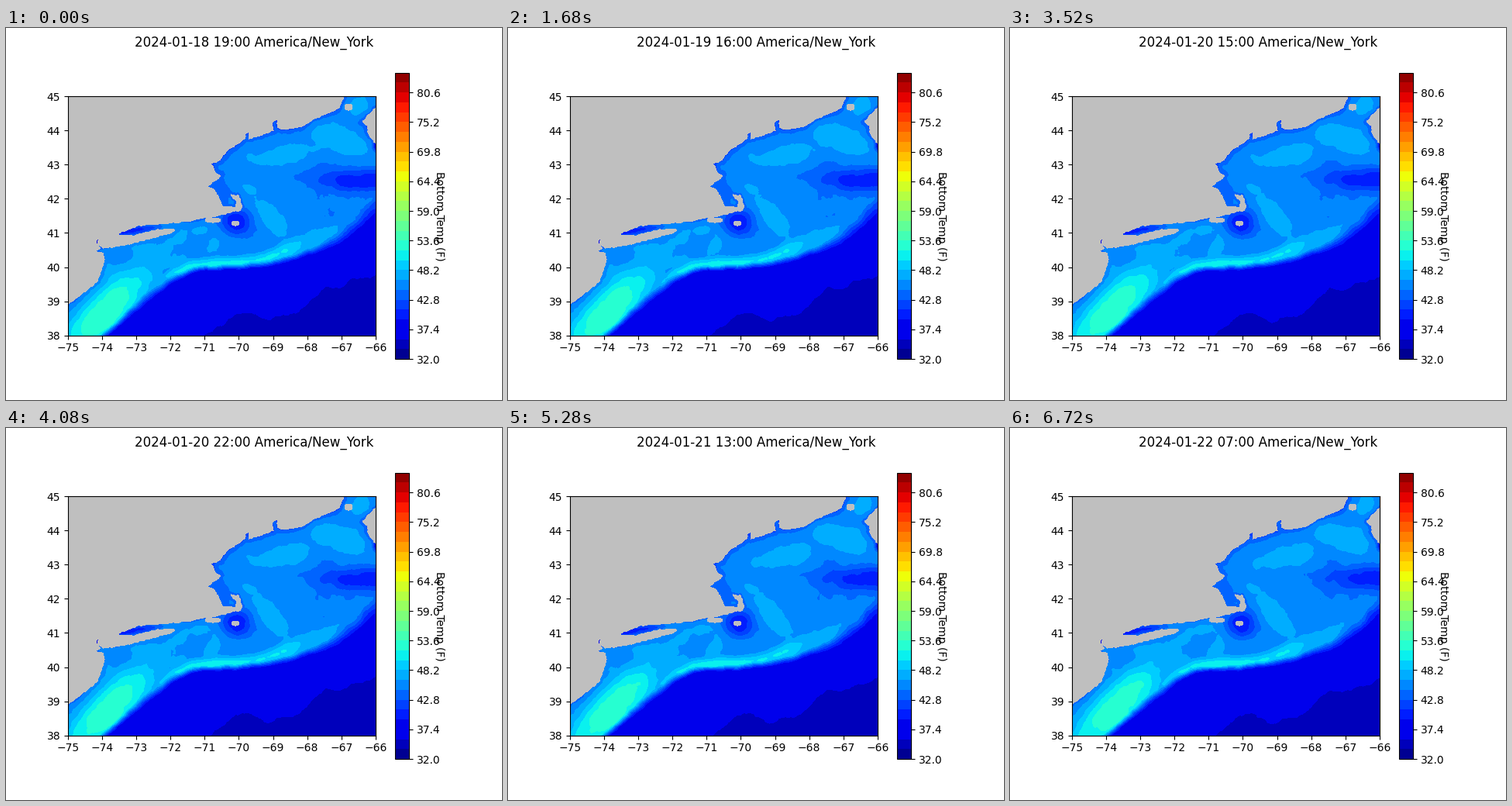
Animation, 640 px wide and 480 px high, one loop 6800 ms. Source, as a matplotlib script:

```python
import numpy as np
import matplotlib.pyplot as plt
from matplotlib.animation import FuncAnimation
from matplotlib.cm import ScalarMappable
from matplotlib.colors import ListedColormap, Normalize
from matplotlib.patches import Ellipse, Polygon
from matplotlib.transforms import Affine2D

FRAMES = 85
BANDS = 29
LEVELS = 32 + 1.8 * np.arange(BANDS + 1)
LAND = "0.75"

rng = np.random.default_rng(5)
palette = plt.get_cmap("jet")((np.arange(BANDS) + 0.5) / BANDS)
palette[2:4, 2] = 0.925  # both cold bands share one blue

fig, ax = plt.subplots(figsize=(6.4, 4.8), dpi=100)
scale = ScalarMappable(Normalize(LEVELS[0], LEVELS[-1]), ListedColormap(palette))
bar = fig.colorbar(scale, ax=ax, boundaries=LEVELS, ticks=LEVELS[::3],
                   format="%.1f")
bar.set_label("Bottom Temp (F)", rotation=270)
ax.set(xlim=(-75, -66), ylim=(38, 45), aspect="equal", facecolor=LAND,
       xticks=range(-75, -65), yticks=range(38, 46))
title = fig.suptitle("")

# Places are given in stage pixels, y down.
DEG = 9 / 396.8
stage = (Affine2D().translate(-80, -88.08).scale(DEG, -DEG)
         .translate(-75, 45) + ax.transData)
xs = np.linspace(80, 476.8, 240)
ys = np.linspace(88.08, 396.7, 187)
X, Y = np.meshgrid(xs, ys)
lon, lat = -75 + (xs - 80) * DEG, 45 - (ys - 88.08) * DEG


def jagged(points):
    """Split a coastline into short steps and shake them a little."""
    parts = []
    for a, b in zip(points, points[1:]):
        a, b = np.array(a, float), np.array(b, float)
        n = int(np.hypot(*(b - a)) / 3) + 1
        parts.append(a + np.linspace(0, 1, n, endpoint=False)[:, None] * (b - a))
    line = np.vstack(parts + [[points[-1]]])
    return line + rng.normal(0, 0.45, line.shape)


def noise():
    """Smooth random field with unit spread."""
    ky = np.fft.fftfreq(ys.size)[:, None]
    kx = np.fft.rfftfreq(xs.size)
    spectrum = np.fft.rfft2(rng.normal(size=X.shape))
    field = np.fft.irfft2(spectrum / (0.03 + np.hypot(kx, ky)) ** 2.2, X.shape)
    return (field - field.mean()) / field.std()


def soft_line(x, points):
    """Height of a rounded line through key points."""
    px, py = np.transpose(points)
    return np.mean([np.interp(x + s, px, py) for s in range(-6, 7, 2)], axis=0)


def bump(u, x, y, rx, ry, deg, amp, dx=0, dy=0):
    """Flat-topped oval that drifts by (dx, dy) over the loop."""
    c, s = np.cos(np.radians(deg)), np.sin(np.radians(deg))
    ox, oy = X - x - u * dx, Y - y - u * dy
    r2 = ((ox * c + oy * s) / rx) ** 2 + ((oy * c - ox * s) / ry) ** 2
    return amp / (1 + r2 ** 2)


# Coast
north = [(434, 80), (435, 90), (430, 103), (420, 108), (411, 112), (398, 117),
         (386, 125), (372, 129), (357, 131), (351, 129), (350, 118), (343, 122),
         (345, 132), (330, 138), (314, 143), (313, 134), (308, 137), (309, 140),
         (303, 147), (285, 158), (276, 170), (268, 174), (257, 174), (266, 177),
         (270, 187), (277, 191), (269, 197), (260, 205), (268, 208), (275, 219),
         (279, 230), (296, 231), (298, 223), (290, 216), (300, 216), (305, 230),
         (302, 235), (281, 240), (272, 243), (256, 245)]
south = [(256, 245), (238, 249), (222, 251), (190, 253), (170, 255), (152, 262),
         (141, 267), (166, 268), (190, 261), (216, 259), (217, 262), (204, 267),
         (175, 275), (148, 281), (125, 284), (120, 279), (118, 266), (117, 278),
         (121, 284), (115, 288), (125, 291), (127, 297), (123, 312), (117, 327),
         (104, 338), (91, 348), (80, 357), (70, 362)]
scotia = [(490, 98), (477, 104), (468, 112), (460, 121), (466, 126), (468, 138),
          (477, 149), (490, 158)]
main = np.vstack([jagged(north), jagged(south)])
east = jagged(scotia)
shapes = [Polygon(np.vstack([main, [(60, 362), (60, 80)]])), Polygon(east),
          Ellipse((442, 102), 10, 8), Ellipse((267, 248), 20, 6),
          Ellipse((296, 252), 10, 6)]
for shape in shapes:
    shape.set(facecolor=LAND, lw=0, antialiased=False, transform=stage, zorder=2)
    ax.add_patch(shape)

# Cold fringe that fades away from the coast
gap = np.full(X.shape, np.inf)
for px, py in np.vstack([main, east]):
    gap = np.minimum(gap, np.hypot(X - px, Y - py))
fringe = np.interp(Y, [140, 200], [2.5, 1.7]) * np.exp(-gap / 4.5)

# Shelf break: distance inshore of the deep edge, and the warm band along it
edge = soft_line(xs, [(60, 452), (133, 397), (180, 361), (216, 331), (243, 317),
                      (300, 314), (340, 310), (380, 299), (424, 286),
                      (456, 267), (477, 248), (500, 224)])
inshore = (edge - Y) / np.hypot(1, np.gradient(edge, xs))
width = np.interp(xs, [130, 180, 240, 380, 477], [10, 14, 9, 10, 24])
core = np.interp(xs, [320, 430], [11, 25])
ridge = np.interp(xs, [185, 215, 300, 360, 385, 430, 445],
                  [0.6, 2.9, 3, 2.6, 1.2, 0.7, 0])
spread = np.interp(xs, [320, 400], [8, 12])
warm_band = ridge * np.exp(-((inshore - core) / spread) ** 2)

# Cold pool offshore
pool = Y - soft_line(xs, [(240, 412), (275, 386), (291, 371), (320, 364),
                          (332, 377), (366, 369), (390, 356), (408, 338),
                          (440, 330), (500, 313)])

# x, y, radii, tilt, strength, drift
warm = [(190, 290, 85, 40, -15, 1), (130, 365, 68, 24, -44, 4, 7, -4),
        (360, 164, 42, 12, -12, 1, 4, 1), (430, 146, 45, 18, 22, 1, 2, 0),
        (342, 244, 32, 15, 45, 1, 2, 1), (314, 208, 9, 5, 30, 1),
        (457, 104, 14, 13, -30, 1, 3, -3)]
cold = [(243, 280, 20, 13, -25, 1, 3, 0), (148, 294, 17, 11, -20, 1, -2, 2),
        (468, 196, 62, 15, 0, 3, 8, -2), (297, 250, 20, 17, 20, 3.2, 2, 3),
        (278, 212, 12, 24, -10, 1), (480, 152, 6, 7, 0, 5),
        (160, 262, 40, 6, -8, 3.4), (118, 272, 5, 9, 0, 5)]
swirl = noise(), noise()
layers = []


def bands(u):
    """Temperature counted in colour bands, at loop position u."""
    n = np.cos(1.2 * u) * swirl[0] + np.sin(1.2 * u) * swirl[1]
    heat = np.max([warm_band] + [bump(u, *w) for w in warm], axis=0)
    chill = np.max([fringe] + [bump(u, *c) for c in cold], axis=0)
    shelf = 7.5 + heat - chill + 0.16 * n
    deep = 2 - np.clip((pool - 3 * u + 2.5 * n) / 15, -0.5, 0.5)
    rise = np.clip((inshore + 0.8 * n) / width, 0, 1)
    return np.clip(deep + rise * (shelf - deep), 0.1, BANDS - 0.1)


def update(i):
    day, hour = divmod(19 + i, 24)
    title.set_text(f"2024-01-{18 + day} {hour:02d}:00 America/New_York")
    while layers:
        layers.pop().remove()
    layers.append(ax.contourf(lon, lat, bands(i / (FRAMES - 1)),
                              levels=range(BANDS + 1), colors=palette,
                              antialiased=False, zorder=1))


anim = FuncAnimation(fig, update, frames=FRAMES, interval=80, repeat=True)
plt.show()
```
